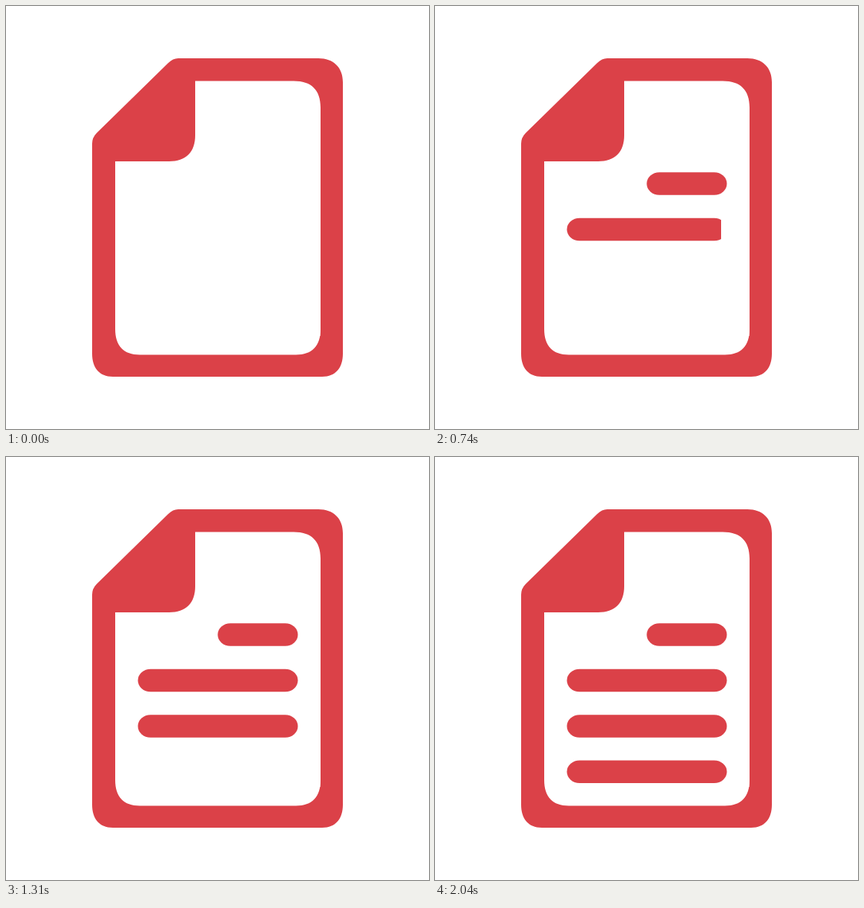
Animation of 550x550 px, one loop 2340 ms. Source, as an HTML page:

```html
<!DOCTYPE html>
<html lang="en">
<head>
<meta charset="utf-8">
<title>Document being written</title>
<style>
  html, body { margin: 0; width: 100%; height: 100%; overflow: hidden; background: #fff; }
  svg { display: block; width: 100%; height: 100%; }
</style>
</head>
<body>
<svg viewBox="0 0 550 550" fill="#db4148">
  <path fill-rule="evenodd" d="
    M224 68H406C426 68 438 80 438 99V452C438 470 429 482 411 482H139C121 482 112 470 112 452V179
    Q112 171 118 165L211 74Q217 68 224 68Z
    M246 97.5V168C246 190 234 202 212 202H142V420C142 442 153 453.5 174 453.5H377
    C398 453.5 409 442 409 420V132C409 109 397 97.5 374 97.5Z"/>
  <g id="lines"></g>
</svg>
<script>
const LOOP = 2340, STEP = 30, RIGHT = 379.5, HEIGHT = 29.5;
const COVER_END = 394.5, COVER_RIGHT = 408.5;

// Each line is uncovered from left to right in equal steps.
const lines = [
  { x: 275.3, y: 216.3, start: 0, steps: 8, coverStart: 271 },
  { x: 171.5, y: 275.8, start: 470, steps: 10, coverStart: 167.5 },
  { x: 171.5, y: 335.2, start: 1010, steps: 10, coverStart: 167.5 },
  { x: 171.5, y: 394.5, start: 1540, steps: 10, coverStart: 167.5 }
];

const group = document.getElementById("lines");

function addRect(attributes) {
  const rect = document.createElementNS(group.namespaceURI, "rect");
  for (const name in attributes) rect.setAttribute(name, attributes[name]);
  return group.appendChild(rect);
}

for (const line of lines) {
  addRect({ x: line.x, y: line.y, width: RIGHT - line.x, height: HEIGHT, rx: 16.5, ry: 14.75 });
  line.cover = addRect({ y: line.y - 5, height: HEIGHT + 10, fill: "#fff" });
}

function draw(now) {
  const time = now % LOOP;
  for (const { start, steps, coverStart, cover } of lines) {
    const step = Math.max(0, Math.min(steps, Math.floor((time - start) / STEP)));
    const edge = Math.round(coverStart + (COVER_END - coverStart) * step / steps);
    cover.setAttribute("x", edge);
    cover.setAttribute("width", COVER_RIGHT - edge);
  }
}

function tick() {
  draw(performance.now());
  requestAnimationFrame(tick);
}
tick();
</script>
</body>
</html>
```
